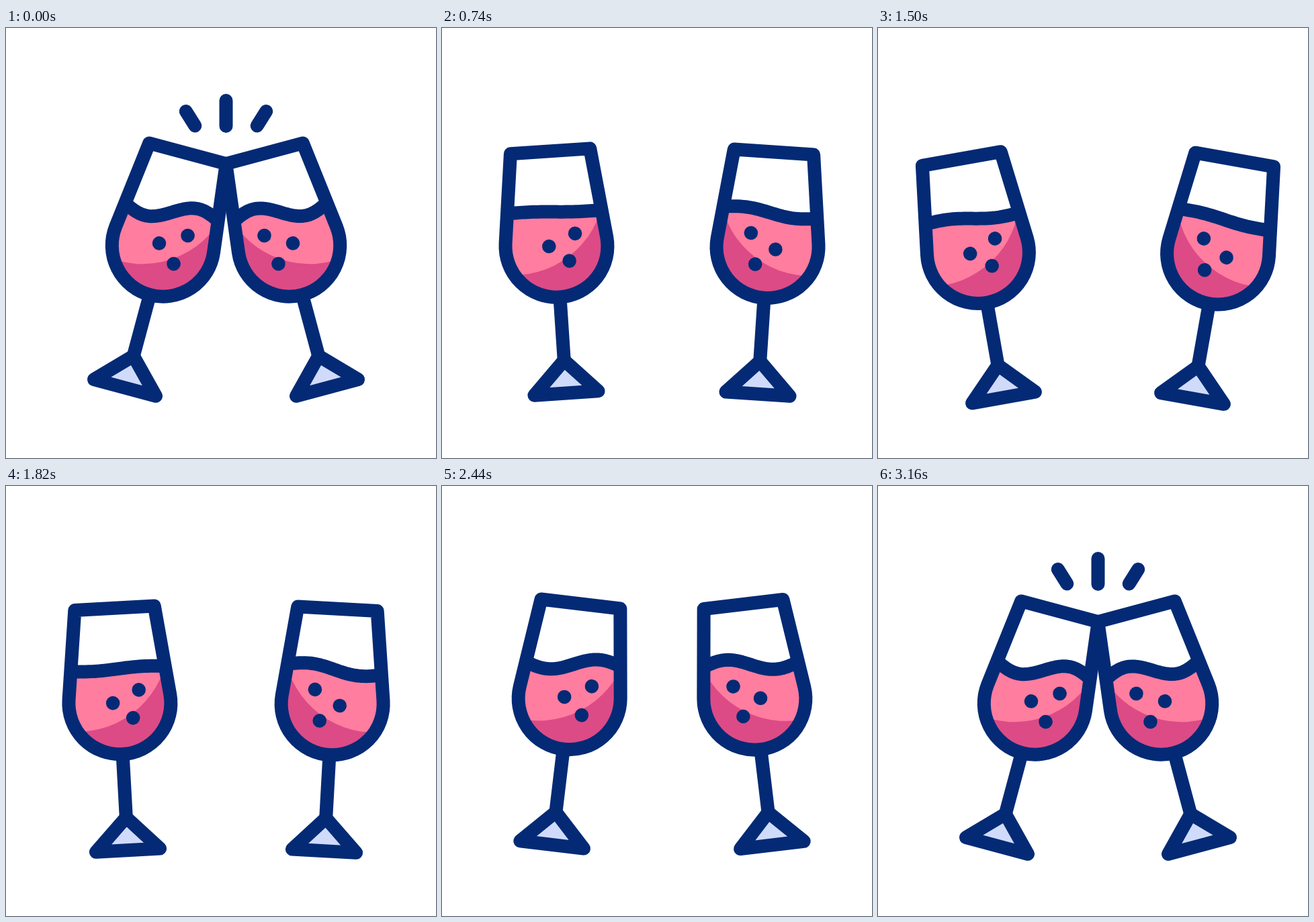
An HTML page with a canvas for the animation above (3.38 s loop, 640 by 640 pixels).

```html
<!DOCTYPE html>
<html lang="en">
<head>
<meta charset="utf-8">
<title>Cheers</title>
<style>
html, body { margin: 0; height: 100%; overflow: hidden; background: #fff; }
canvas { display: block; width: 640px; height: 640px; }
</style>
</head>
<body>
<canvas id="stage" width="640" height="640"></canvas>
<script>
const ctx = document.getElementById('stage').getContext('2d');
const LOOP = 3380, STEP = 20, MID = 327.5;
const NAVY = '#042a75', PINK = '#ff7d9f', ROSE = '#dc4b86', PALE = '#d0dbfb';

// time, foot x, foot y, tilt in degrees, wave height left, wave height right
const KEYS = [
  [200, 177, 535.5, 15, 12.5, 12.5],
  [480, 181.5, 539, 5.8, 5.3, 8],
  [740, 185, 543.5, -3.8, -1, 4],
  [1020, 187, 547, -8.4, -3.7, 2],
  [1280, 187.2, 549.5, -9.8, -3.7, 2],
  [1500, 187, 550, -10, -3, 2],
  [1840, 181, 541.5, -2.6, 2, 5.5],
  [2140, 164, 526, 9.7, 8, 9.5],
  [2200, 163.6, 525, 10, 9, 10],
  [2380, 163.6, 530, 8, 9, 9.5],
  [2580, 163.7, 543, 4.4, 8, 8],
  [2740, 163.7, 539.5, 5.7, 8.5, 8.5],
  [2920, 168, 537, 9.5, 10, 10],
  [3160, 177, 535.5, 15, 12.5, 12.5]
];
const BUBBLES = [[-6.4, -221], [31.7, -243], [22.3, -197]];
const DRIFT = {
  left: [[-5.6, 1.5], [-3.5, 8], [-5.5, 1]],
  right: [[-7, 5.5], [-7, 5.5], [-7, 5.5]]
};

const clamp = v => Math.min(1, Math.max(0, v));

function slope(i, c) {
  const a = KEYS[i], b = KEYS[i + 1];
  return (b[c] - a[c]) / (b[0] - a[0]);
}

// Tangent that never overshoots the keys
function tangent(i, c) {
  if (i === 0) return slope(0, c);
  if (i === KEYS.length - 1) return slope(i - 1, c);
  const a = slope(i - 1, c), b = slope(i, c);
  return a * b <= 0 ? 0 : 2 * a * b / (a + b);
}

function valueAt(t, c) {
  const last = KEYS.length - 1;
  if (t <= KEYS[0][0]) return KEYS[0][c];
  if (t >= KEYS[last][0]) return KEYS[last][c];
  const i = KEYS.findIndex(k => k[0] > t) - 1;
  const a = KEYS[i], b = KEYS[i + 1], d = b[0] - a[0], u = (t - a[0]) / d;
  const w = u * u * (3 - 2 * u);
  return a[c] + (b[c] - a[c]) * w
    + d * u * (1 - u) * ((1 - u) * tangent(i, c) - u * tangent(i + 1, c));
}

function line(points, close) {
  const path = new Path2D();
  points.forEach(([x, y]) => path.lineTo(x, y));
  if (close) path.closePath();
  return path;
}

const disc = (x, y, r) => {
  ctx.beginPath();
  ctx.arc(x, y, r, 0, Math.PI * 2);
  ctx.fill();
};

const bowl = new Path2D('M-59.3-361L-75.5-228A76 76 0 1 0 75.5-228L59.3-361Z');
const stem = new Path2D('M0-143V-49');
const foot = new Path2D('M0-49L47.7 0H-47.7Z');

// Drawn with the middle of the foot at the origin
function glass(t, side) {
  const right = side === 'right';
  const height = valueAt(t, right ? 5 : 4);
  const shift = (12.5 - height) / (right ? 10.5 : 16);
  const lean = right ? -0.06 : Math.max(-0.066, 0.015 - 0.012 * height);

  ctx.save();
  if (right) {
    ctx.translate(MID * 2, 1.5 * shift);
    ctx.scale(-1, 1);
  }
  ctx.translate(valueAt(t, 1), valueAt(t, 2));
  ctx.rotate(valueAt(t, 3) * Math.PI / 180);

  const wave = [];
  for (let x = -80; x <= 80; x += 4)
    wave.push([x, -270.5 + lean * x - height * Math.sin(x * Math.PI / 71)]);

  ctx.save();
  ctx.clip(bowl);
  ctx.save();
  ctx.clip(line([...wave, [80, -130], [-80, -130]], true));
  ctx.fillStyle = ROSE;
  ctx.fillRect(-80, -320, 160, 190);
  ctx.fillStyle = PINK;
  disc(-58, -316, 136);
  ctx.restore();
  ctx.stroke(line(wave));
  ctx.restore();

  ctx.fillStyle = NAVY;
  BUBBLES.forEach(([x, y], i) => {
    const [dx, dy] = DRIFT[side][i];
    disc(x + dx * shift, y + dy * shift, 10.3);
  });

  ctx.fillStyle = PALE;
  ctx.fill(foot);
  [stem, foot, bowl].forEach(p => ctx.stroke(p));
  ctx.restore();
}

// Rays shoot outwards after the clink and grow back just before the next one
function rays(t) {
  const leave = clamp((t - 200) / 200), grow = clamp((t - 3040) / 120);
  if (leave === 1 && grow === 0) return;
  const out = grow ? 0 : leave;
  const ray = (x1, y1, x2, y2) => {
    const dx = x2 - x1, dy = y2 - y1, len = Math.hypot(dx, dy);
    const from = out * (1 + 12 / len);
    const to = grow ? grow : 1 + out * 12 / len;
    ctx.stroke(line([[x1 + dx * from, y1 + dy * from], [x1 + dx * to, y1 + dy * to]]));
  };
  ctx.save();
  ctx.lineWidth = 20 * Math.min(1, 2 * (1 - out), grow ? 2 * grow : 1);
  ray(MID, 146, MID, 108);
  ray(281.3, 145.5, 267.8, 124);
  ray(373.7, 145.5, 387.2, 124);
  ctx.restore();
}

function draw(now) {
  const t = Math.floor(now % LOOP / STEP) * STEP;
  ctx.fillStyle = '#fff';
  ctx.fillRect(0, 0, 640, 640);
  ctx.strokeStyle = NAVY;
  ctx.lineWidth = 20;
  ctx.lineCap = ctx.lineJoin = 'round';
  glass(t, 'left');
  glass(t, 'right');
  rays(t);
}

const start = performance.now();
function tick() {
  draw(performance.now() - start);
  requestAnimationFrame(tick);
}
tick();
</script>
</body>
</html>
```
